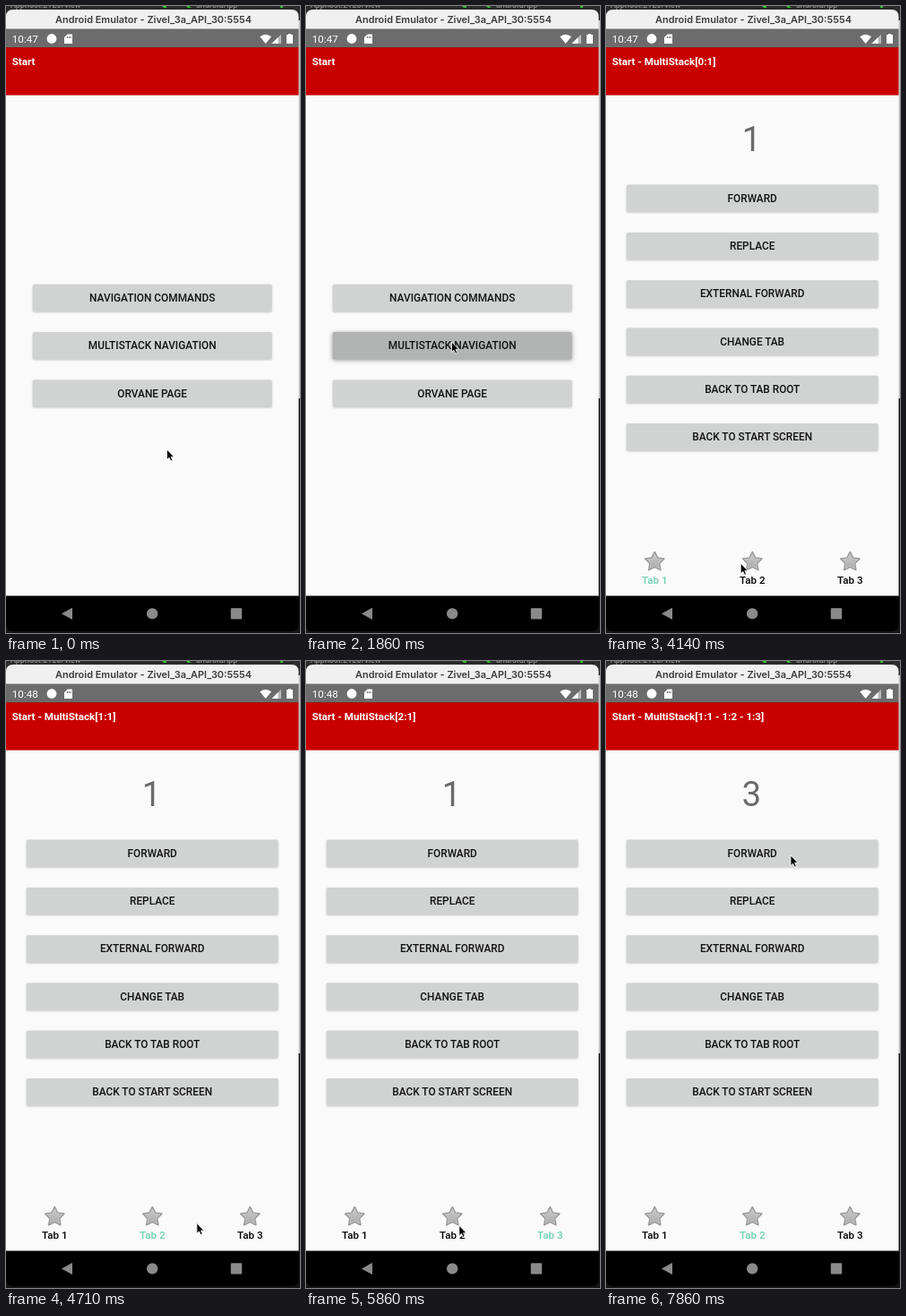
Animation of 328 by 700 pixels, one loop 8000 ms. Source, as an HTML page:

```html
<!DOCTYPE html>
<html lang="en">
<head>
<meta charset="utf-8">
<title>Emulator navigation</title>
<style>
html, body { margin: 0; width: 100%; height: 100%; overflow: hidden; background: #141414; }
svg { display: block; width: 328px; height: 700px; font: 500 11.65px Roboto, sans-serif; }
.mid { text-anchor: middle; }
.label { font-size: 11.85px; fill: #121212; }
</style>
</head>
<body>
<svg viewBox="0 0 328 700" xmlns="http://www.w3.org/2000/svg">
  <defs>
    <linearGradient id="starFill" x1="0" y1="0" x2="0" y2="1">
      <stop offset="0" stop-color="#cfcfcf"/>
      <stop offset="1" stop-color="#a8a8a8"/>
    </linearGradient>
    <filter id="soft" x="-10%" y="-50%" width="120%" height="200%">
      <feGaussianBlur stdDeviation="1"/>
    </filter>
    <filter id="deep" x="-10%" y="-50%" width="120%" height="200%">
      <feGaussianBlur stdDeviation="2.4"/>
    </filter>
  </defs>

  <!-- desktop behind the window -->
  <rect width="328" height="700" fill="#141414"/>
  <rect width="328" height="16" fill="#2a2a2b"/>
  <g font-size="9" fill="#8a8a8a">
    <text x="5" y="2">Apphost.2120/view</text>
    <text x="212" y="2">androidApp</text>
  </g>
  <path d="M174 0h5v2h-3zM201 0h3l3 2h-4zM306 0h3v2h-3z" fill="#35c12f"/>
  <rect x="326" y="16" width="2" height="422" fill="#c8c8c8"/>

  <!-- window -->
  <path d="M0 26V12Q0 4 8 4H318.500Q326.500 4 326.500 12V26Z" fill="#f1f0f1"/>
  <text class="mid" x="164.500" y="18.600" fill="#3b3b3b" style="font:600 10.95px Inter,sans-serif">Android Emulator - Zivel_3a_API_30:5554</text>
  <rect y="25.500" width="326.500" height="21" fill="#6c6c6c"/>
  <rect y="99" width="326.500" height="560" fill="#fafafa"/>
  <rect y="46.300" width="326.500" height="53.300" fill="#c80000"/>
  <path d="M0 658.500H326.500V690Q326.500 698 318.500 698H8Q0 698 0 690Z" fill="#000"/>

  <!-- status bar -->
  <text id="clock" x="6.800" y="41" fill="#fff" font-weight="400"></text>
  <g fill="#fff">
    <circle cx="51" cy="36.500" r="5.400"/>
    <path fill-rule="evenodd" d="M68.500 31.500H74V42H65V35ZM67.900 34v2h1v-2zM69.800 34v2h1v-2zM71.700 34v2h1v-2z"/>
    <path d="M283.300 34.200Q289.700 29.200 296 34.200L289.700 42Z"/>
    <path d="M307 31.500V42H296.500Z" opacity=".5"/>
    <path d="M303.500 35V42H296.500Z"/>
    <path d="M315 31h3v1h2v10h-7v-10h2z"/>
  </g>
  <text id="title" x="6.700" y="65.700" fill="#fff" font-weight="700"></text>

  <g id="startPage"></g>
  <g id="stackPage">
    <rect id="ripple" y="596.500" width="109" height="62" fill="#d7d7d7"/>
    <text id="count" class="mid" x="162.500" y="162" font-size="38" font-weight="400" fill="#6a6a6a"></text>
  </g>

  <!-- system keys -->
  <g fill="#8a8a8a">
    <path d="M62 678.400L74 671.800V685Z"/>
    <circle cx="163.200" cy="678.400" r="6.200"/>
    <rect x="250.800" y="672.200" width="12.400" height="12.400" rx="1"/>
  </g>

  <path id="cursor" d="M0 0V11.500L2.600 9.200L4.300 13L6.200 12.200L4.600 8.300H8Z" fill="#000" stroke="#fff" stroke-width=".8" stroke-linejoin="round"/>
</svg>
<script>
const NS = "http://www.w3.org/2000/svg";
const LOOP = 8000, STEP = 1000 / 7, PITCH = 53.3, TAB_WIDTH = 109;
const $ = id => document.getElementById(id);

function add(parent, tag, attrs, text) {
  const el = document.createElementNS(NS, tag);
  for (const key in attrs) el.setAttribute(key, attrs[key]);
  if (text) el.textContent = text;
  parent.appendChild(el);
  return el;
}

// Each button returns a function that sets its pressed look
function addButton(page, label, width, cy) {
  const box = { x: 163.2 - width / 2, y: cy - 15.2, width, height: 30.4, rx: 1.5 };
  const shadow = add(page, "rect", { ...box, y: box.y + 0.8 });
  const face = add(page, "rect", box);
  add(page, "text", { class: "mid label", x: 163.2, y: cy + 4 }, label);
  return down => {
    face.setAttribute("fill", down ? "#b2b4b3" : "#d1d3d2");
    shadow.setAttribute("fill", down ? "#8f8f8f" : "#c4c4c4");
    shadow.setAttribute("filter", down ? "url(#deep)" : "url(#soft)");
  };
}

const addButtons = (page, labels, width, top) =>
  labels.map((label, i) => addButton(page, label, width, top + PITCH * i));

function starPoints(cx, cy, radius) {
  return Array.from({ length: 10 }, (_, i) => {
    const r = i % 2 ? radius / 2 : radius, a = (i / 5 - 0.5) * Math.PI;
    return [cx + r * Math.cos(a), cy + r * Math.sin(a)];
  }).join(" ");
}

function addTab(page, i) {
  const cx = 54.3 + TAB_WIDTH * i;
  const star = (radius, look) => add(page, "polygon",
    { points: starPoints(cx, 620.6, radius), "stroke-linejoin": "round", ...look });
  star(11, { fill: "url(#starFill)", stroke: "#999", "stroke-width": 1.8 });
  star(9, { fill: "none", stroke: "#c9c9c9", "stroke-width": 0.8 });
  return add(page, "text", { class: "mid", x: cx, y: 645 }, "Tab " + (i + 1));
}

const startPage = $("startPage"), stackPage = $("stackPage");
const startButtons = addButtons(startPage, ["NAVIGATION COMMANDS", "MULTISTACK NAVIGATION", "ORVANE PAGE"], 266.8, 326);
const stackButtons = addButtons(stackPage,
  ["FORWARD", "REPLACE", "EXTERNAL FORWARD", "CHANGE TAB", "BACK TO TAB ROOT", "BACK TO START SCREEN"], 280.6, 214.8);
const tabs = [0, 1, 2].map(i => addTab(stackPage, i));

// Times count in steps of the screen refresh
const HOME = { x: 179.5, y: 495 };
const moves = [
  { from: 2, to: 7, x: 168, y: 320 },
  { from: 7, to: 10, x: 162.5, y: 375 },
  { from: 17, to: 22, x: 51.5, y: 632 },
  { from: 26, to: 31, x: 157, y: 621.5 },
  { from: 32, to: 37, x: 271.5, y: 634 },
  { from: 39, to: 42, x: 167, y: 630 },
  { from: 43, to: 48, x: 206, y: 217 }
];
const taps = [{ at: 24, tab: 0 }, { at: 30, tab: 1 }, { at: 37, tab: 2 }, { at: 42, tab: 1 }];
const OPEN = 14, FORWARDS = [50, 55], TAP_HOLD = 2, CLOCK_TICK = 30;

const clamp = u => Math.min(1, Math.max(0, u));
const easeOut = u => 1 - (1 - u) ** 3;

function cursorAt(step) {
  return moves.reduce((p, m) => {
    const u = easeOut(clamp((step - m.from) / (m.to - m.from)));
    return { x: p.x + (m.x - p.x) * u, y: p.y + (m.y - p.y) * u };
  }, HOME);
}

function render(ms) {
  const step = Math.floor((ms + 5) / STEP) % 56;
  const open = step >= OPEN;
  const tap = taps.filter(t => t.at <= step).pop();
  const tab = tap ? tap.tab : 1;
  const held = tap && step < tap.at + TAP_HOLD;
  const depth = 1 + FORWARDS.filter(at => at <= step).length;
  const trail = Array.from({ length: depth }, (_, i) => tab + ":" + (i + 1)).join(" - ");

  $("clock").textContent = step < CLOCK_TICK ? "10:47" : "10:48";
  $("title").textContent = open ? `Start - MultiStack[${trail}]` : "Start";
  $("count").textContent = depth;
  startPage.style.display = open ? "none" : "";
  stackPage.style.display = open ? "" : "none";
  startButtons.forEach((press, i) => press(i === 1 && step === OPEN - 1));
  stackButtons.forEach((press, i) => press(i === 0 && step === FORWARDS[1] - 1));
  tabs.forEach((label, i) => label.setAttribute("fill", i !== tab ? "#000" : held ? "#57b897" : "#6fd0b2"));
  $("ripple").setAttribute("x", TAB_WIDTH * tab);
  $("ripple").style.display = held ? "" : "none";
  const { x, y } = cursorAt(step);
  $("cursor").setAttribute("transform", `translate(${x} ${y})`);
}

let begin;
function tick(now) {
  begin ??= now;
  render((now - begin) % LOOP);
  requestAnimationFrame(tick);
}
render(0);
requestAnimationFrame(tick);
</script>
</body>
</html>
```
